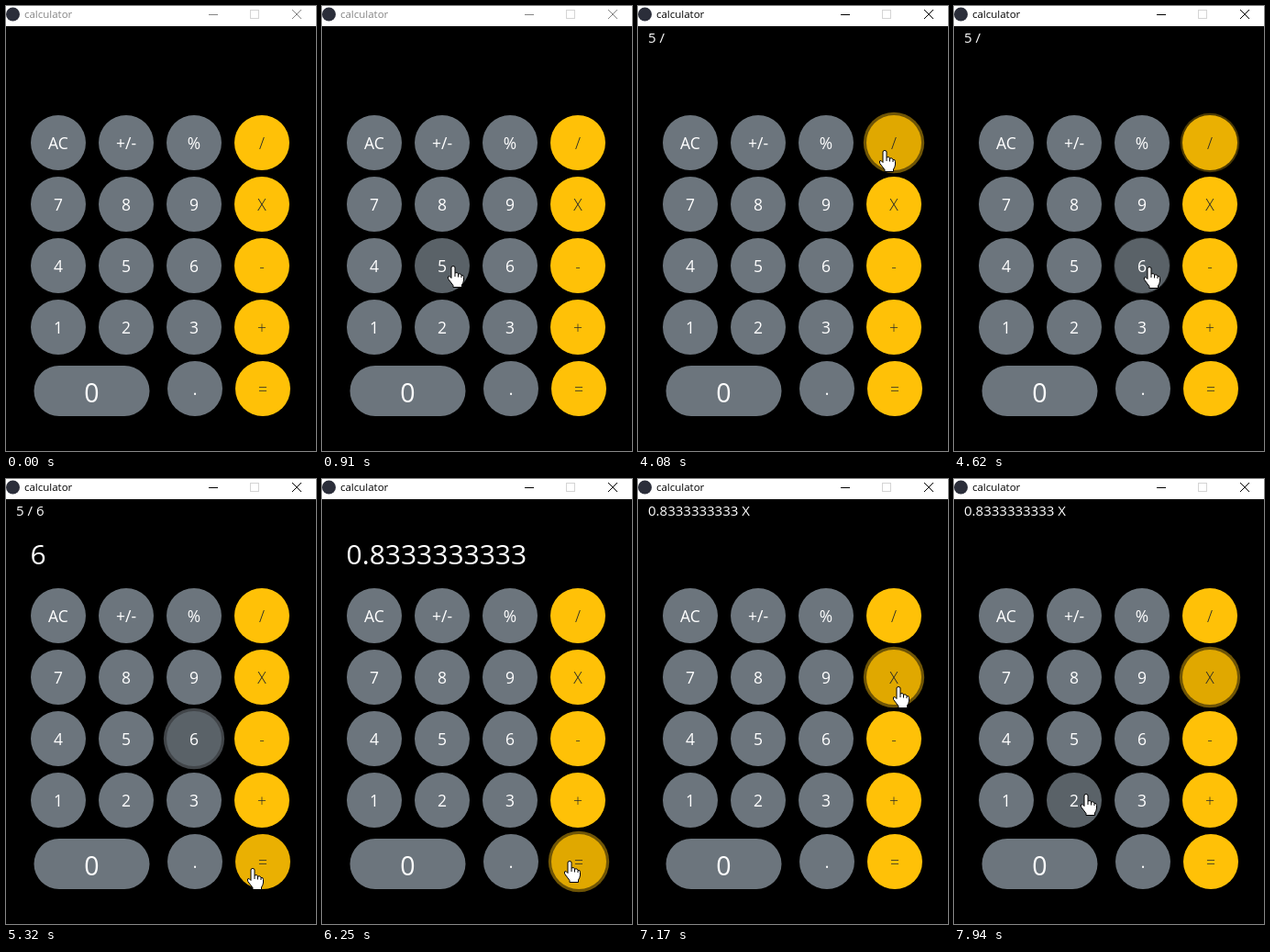
These frames come from a looping animation (338x485 px, 8 s). An HTML page with a canvas:

```html
<!DOCTYPE html>
<html lang="en">
<head>
<meta charset="utf-8">
<title>calculator</title>
<style>
html, body { margin: 0; width: 100%; height: 100%; overflow: hidden; background: #000; }
canvas { display: block; }
</style>
</head>
<body>
<canvas id="stage" width="338" height="485"></canvas>
<script>
const ctx = document.getElementById('stage').getContext('2d');
const LOOP = 8000, TICK = 77.3, FIRST_TICK = 195;
const FONT = '"Open Sans", "Noto Sans", sans-serif';

// The screen advances in ticks; all times below are tick numbers.
const ENTRY = [309, 464];
const moves = [ // start, end, x, y
  [0, 9, 143, 283],
  [24, 28, 244, 154], [28, 31, 273, 144], [39, 41, 269, 157],
  [51, 57, 213, 284],
  [60, 64, 266, 444], [64, 68, 270, 416],
  [78, 85, 292, 213], [89, 90, 284, 226],
  [90, 100, 144, 343]
];
const presses = [[22, '5'], [48, '/'], [57, '6'], [69, '='], [86, 'X']];

const GRAY = { base: [108, 117, 125], dark: [90, 98, 104], ring: '130,138,145', ink: '#fff', weight: 500 };
const AMBER = { base: [255, 193, 7], dark: [224, 168, 0], ring: '222,170,12', ink: '#212529', weight: 300 };

const button = (label, x, y, theme = GRAY, w = 60, h = 60, size = 17.5) => ({ label, x, y, theme, w, h, size });
const buttons = [...'AC +/- % / 7 8 9 X 4 5 6 - 1 2 3 +'.split(' ').map((label, i) =>
  button(label, 57 + 74 * (i % 4), 149 + 67 * Math.floor(i / 4), i % 4 === 3 ? AMBER : GRAY)),
  button('0', 93.5, 419.5, GRAY, 126, 55, 28.5),
  button('.', 206, 417),
  button('=', 280, 417, AMBER)
];

const HAND = new Path2D('M-2 2Q-2 .5 0 .5Q2 .5 2 2V8Q5 6.5 5.5 9Q8.5 8 9 10.5Q11.5 9.8 11.5 12.5V16' +
  'Q11 19 9.5 21V23.5H0V21.5L-5.3 14.5Q-6.5 11 -4 11.5L-2 13.5Z');
const KNUCKLES = new Path2D('M2 8V12M5.5 9V12.5M9 10.5V13');
const ARROW = new Path2D('M0 0V16L3.7 12.4L6.2 18.2L8.4 17.2L6 11.6H11Z');

function pointerAt(n) {
  if (n < 0) return null;
  let [x, y] = ENTRY;
  for (const [start, end, toX, toY] of moves) {
    if (n <= start) break;
    const k = Math.sin(Math.min(1, (n - start) / (end - start)) * Math.PI / 2);
    x += (toX - x) * k;
    y += (toY - y) * k;
  }
  return [Math.round(x), Math.round(y)];
}

function contains(b, [x, y]) {
  const r = b.h / 2, dx = Math.max(0, Math.abs(x - b.x) - (b.w / 2 - r));
  return Math.hypot(dx, y - b.y) <= r;
}

function hovered(b, n) {
  const p = pointerAt(n);
  return !!p && contains(b, p);
}

const pressesUntil = n => presses.filter(([tick]) => tick <= n).map(([, label]) => label);
const focused = (b, n) => pressesUntil(n).pop() === b.label;

// Each transition is spread over three ticks
const fade = (test, n) => (test(n) + test(n - 1) + test(n - 2)) / 3;

// Replays the keys; the display follows a press by one tick
function calculate(n) {
  let history = '', value = '';
  for (const key of pressesUntil(n - 1)) {
    if (key === '=') {
      const [a, , b] = history.split(' ');
      value = (a / b).toFixed(10);
      history = '';
    } else if (/\d/.test(key)) {
      history = `${history} ${key}`.trim();
      value = key;
    } else {
      history = `${history || value} ${key}`;
      value = '';
    }
  }
  return { history, value };
}

function text(str, x, y, size, color, weight = 400, align = 'left') {
  ctx.font = `${weight} ${size}px ${FONT}`;
  ctx.textAlign = align;
  ctx.fillStyle = color;
  ctx.fillText(str, x, y);
}

function pill(b, grow, color) {
  ctx.beginPath();
  ctx.roundRect(b.x - b.w / 2 - grow, b.y - b.h / 2 - grow, b.w + 2 * grow, b.h + 2 * grow, b.h / 2 + grow);
  ctx.fillStyle = color;
  ctx.fill();
}

function drawButton(b, n) {
  const { base, dark, ring, ink, weight } = b.theme;
  const focus = fade(m => focused(b, m), n);
  const shade = fade(m => focused(b, m) || hovered(b, m), n);
  if (focus) pill(b, 3.2 * focus, `rgba(${ring},${0.5 * focus})`);
  pill(b, 0, `rgb(${base.map((v, i) => Math.round(v + (dark[i] - v) * shade))})`);
  text(b.label, b.x, b.y + (b.label === '0' ? 12 : 6.5), b.size, ink, weight, 'center');
}

function drawTitleBar(active) {
  const ink = active ? '#000' : '#858585';
  ctx.fillStyle = '#fff';
  ctx.fillRect(0, 0, 338, 22);
  ctx.beginPath();
  ctx.arc(7.5, 9, 7.5, 0, 7);
  ctx.fillStyle = '#2b2e3a';
  ctx.fill();
  text('calculator', 20, 13, 11.5, ink);
  ctx.lineWidth = 1;
  ctx.strokeStyle = '#d4d4d4';
  ctx.strokeRect(266.5, 4.5, 9, 9);
  ctx.strokeStyle = ink;
  ctx.stroke(new Path2D('M221 9.5H231M312 4L322 14M322 4L312 14'));
}

function drawPointer(p) {
  const hand = buttons.some(b => contains(b, p));
  const shape = hand ? HAND : ARROW;
  ctx.save();
  ctx.translate(...p);
  ctx.fillStyle = '#fff';
  ctx.strokeStyle = '#000';
  ctx.fill(shape);
  ctx.stroke(shape);
  if (hand) ctx.stroke(KNUCKLES);
  ctx.restore();
}

function draw() {
  const n = Math.floor((performance.now() % LOOP - FIRST_TICK) / TICK);
  ctx.fillStyle = '#000';
  ctx.fillRect(0, 0, 338, 485);
  drawTitleBar(n >= presses[0][0]);
  const { history, value } = calculate(n);
  text(history, 11, 40, 15, '#fff', 500);
  text(value, 26.5, 93, 30, '#fff', 500);
  buttons.forEach(b => drawButton(b, n));
  const p = pointerAt(n);
  if (p) drawPointer(p);
  requestAnimationFrame(draw);
}
draw();
</script>
</body>
</html>
```
